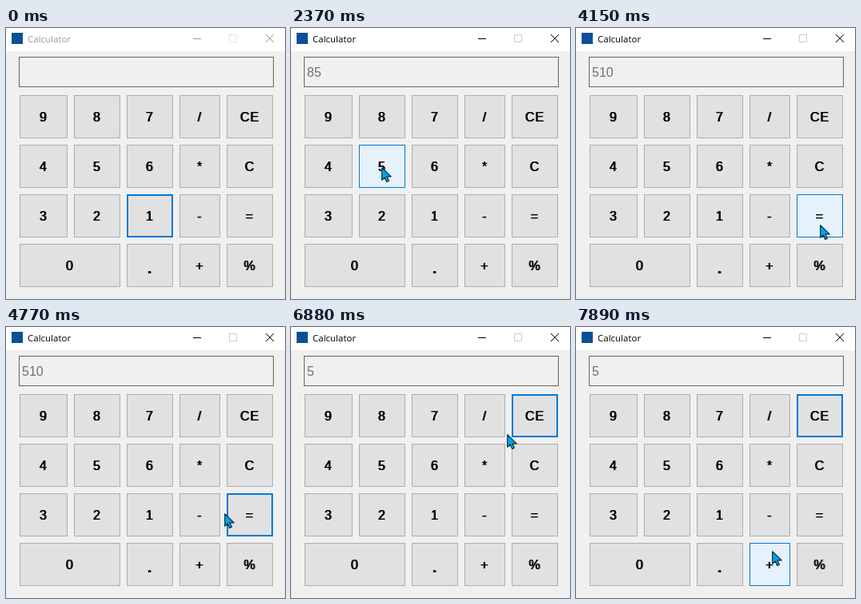
An HTML page for the animation above (8 s loop, 349x339 px).

```html
<!DOCTYPE html>
<html lang="en">
<head>
<meta charset="utf-8">
<title>Calculator</title>
<style>
  html, body { margin: 0; width: 100%; height: 100%; overflow: hidden; background: #f0f0f0; }
  #win { position: relative; width: 349px; height: 339px; overflow: hidden; cursor: default; user-select: none; }
  #win > * { position: absolute; box-sizing: border-box; }
  #bar { left: 0; top: 0; width: 349px; height: 29px; background: #fff; color: #000; }
  #bar.idle { color: #999; }
  #bar i { position: absolute; left: 7px; top: 6px; width: 14px; height: 14px; background: #0b4f96; }
  #bar span { position: absolute; left: 27px; top: 4px; font: 11.5px/19px "Open Sans", "Noto Sans", sans-serif; }
  #bar svg { position: absolute; left: 0; top: 0; fill: none; stroke: currentColor; }
  #max { stroke: #ccc; }
  .idle #max { stroke: #e6e6e6; }
  #out {
    left: 16px; top: 36px; width: 319px; height: 38px; padding-left: 3px;
    border: 1px solid #646464; color: #69747a; white-space: pre;
    font: 16px/38px "Liberation Sans", Arial, sans-serif;
  }
  .key {
    display: flex; align-items: center; justify-content: center;
    height: 54px; padding: 2px 1px 0 0;
    background: #e1e1e1; border: 1px solid #adadad; color: #000;
    font: 16px "Liberation Sans", Arial, sans-serif; letter-spacing: 1px;
    text-shadow: 1px 0 #000;
  }
  .dot { font-size: 26px; }
  .focus { border: 2px solid #0078d7; }
  .hover { background: #e5f1fb; border: 1px solid #0078d7; }
  .down { background: #cce4f7; border: 1px solid #005499; }
  #arrow, #spot { left: 0; top: 0; }
  #arrow { margin-left: -1px; }
  #spot { width: 25px; height: 25px; margin: -13px 0 0 -14px; border-radius: 50%; background: rgba(255, 255, 0, .5); }
</style>
</head>
<body>
<div id="win">
  <div id="bar">
    <i></i><span>Calculator</span>
    <svg width="349" height="29">
      <path d="M234 13.5h10M325 8l10 10M335 8l-10 10"/>
      <path id="max" d="M279.5 8.5h9v9h-9z"/>
    </svg>
  </div>
  <div id="out"></div>
</div>
<script>
const LOOP = 8000, ACTIVE_AT = 1740, TICK = 78, HOLD = 80, KEY_H = 54;
const win = document.getElementById('win');
const bar = document.getElementById('bar');
const out = document.getElementById('out');

const left = [17, 85, 151, 217, 276];
const width = [60, 58, 58, 51, 58];
const keys = [];
['9 8 7 / CE', '4 5 6 * C', '3 2 1 - =', '0 _ . + %'].forEach((row, r) => {
  row.split(' ').forEach((label, c) => {
    if (label === '_') return; // covered by the wide 0
    const x = left[c], y = 84 + r * 62, w = label === '0' ? 126 : width[c];
    const el = document.createElement('div');
    el.textContent = label;
    el.style.cssText = `left:${x}px;top:${y}px;width:${w}px`;
    win.append(el);
    keys.push({ label, x, y, w, el });
  });
});

win.insertAdjacentHTML('beforeend', `
  <svg id="arrow" width="16" height="22">
    <path d="M.7 .8V16.2L4.3 13L6.7 18.4L9.4 17.2L7 11.9H12.2Z"
      fill="#00a5ec" stroke="#102a3c" stroke-width="1.2" stroke-linejoin="round"/>
  </svg>
  <div id="spot"></div>`);
const arrow = document.getElementById('arrow');
const spot = document.getElementById('spot');

// Pointer glides: start, end, from, to, optional bend (quadratic control point)
const glides = [
  [910, 1360, [143, 263], [112, 116], [17, 186]],
  [1980, 2210, [112, 122], [114, 174]],
  [2450, 2610, [150, 172], [243, 174]],
  [2920, 3150, [232, 175], [193, 174]],
  [3300, 3530, [205, 185], [262, 251]],
  [3610, 3690, [290, 251], [306, 246]],
  [4230, 4540, [300, 264], [254, 330]],
  [4700, 5170, [261, 290], [304, 102]],
  [5790, 5870, [300, 112], [295, 120]],
  [6190, 6260, [296, 117], [296, 114]],
  [6880, 7660, [271, 134], [243, 118], [-15, 270]],
  [7730, 7890, [246, 165], [246, 280]],
];

// Clicks: time, key, optional hold
const clicks = [
  [1740, '8', 160], [2290, '5'], [2770, '*'], [3150, '6'],
  [3840, '='], [5400, 'CE'], [6570, 'CE'],
];

function pointer(t) {
  const glide = glides.findLast(g => g[0] <= t);
  if (!glide) return null;
  const [start, end, from, to, bend] = glide;
  const steps = Math.round((end - start) / TICK);
  const step = Math.min(steps, Math.floor((t - start) / (end - start) * steps + .15));
  const u = 1 - (1 - step / steps) ** 2;
  const [x, y] = from.map((a, i) => {
    const mid = bend ? bend[i] : (a + to[i]) / 2;
    return Math.round((1 - u) ** 2 * a + 2 * u * (1 - u) * mid + u * u * to[i]);
  });
  return { x, y };
}

function type(text, key) {
  if (key === 'CE') return text.slice(0, -1);
  if (key !== '=') return text + key;
  const [a, b] = text.split('*');
  return String(a * b);
}

const inside = (k, p) => p.x >= k.x && p.x < k.x + k.w && p.y >= k.y && p.y < k.y + KEY_H;

function draw(t) {
  const p = pointer(t);
  let text = '', focus = '1', pressed = false;
  for (const [at, key, hold = HOLD] of clicks) {
    if (t < at) break;
    focus = key;
    pressed = t < at + hold;
    if (!pressed) text = type(text, key);
  }

  bar.className = t < ACTIVE_AT ? 'idle' : '';
  out.textContent = text;
  for (const k of keys) {
    let state = k.label === focus ? 'focus' : '';
    if (p && inside(k, p)) state = pressed ? 'down' : 'hover';
    k.el.className = `key ${state} ${k.label === '.' ? 'dot' : ''}`;
  }
  arrow.style.display = p ? '' : 'none';
  spot.style.display = pressed ? '' : 'none';
  if (p) arrow.style.transform = spot.style.transform = `translate(${p.x}px, ${p.y}px)`;
}

const start = performance.now();
function tick() {
  draw((performance.now() - start) % LOOP);
  requestAnimationFrame(tick);
}
tick();
</script>
</body>
</html>
```
